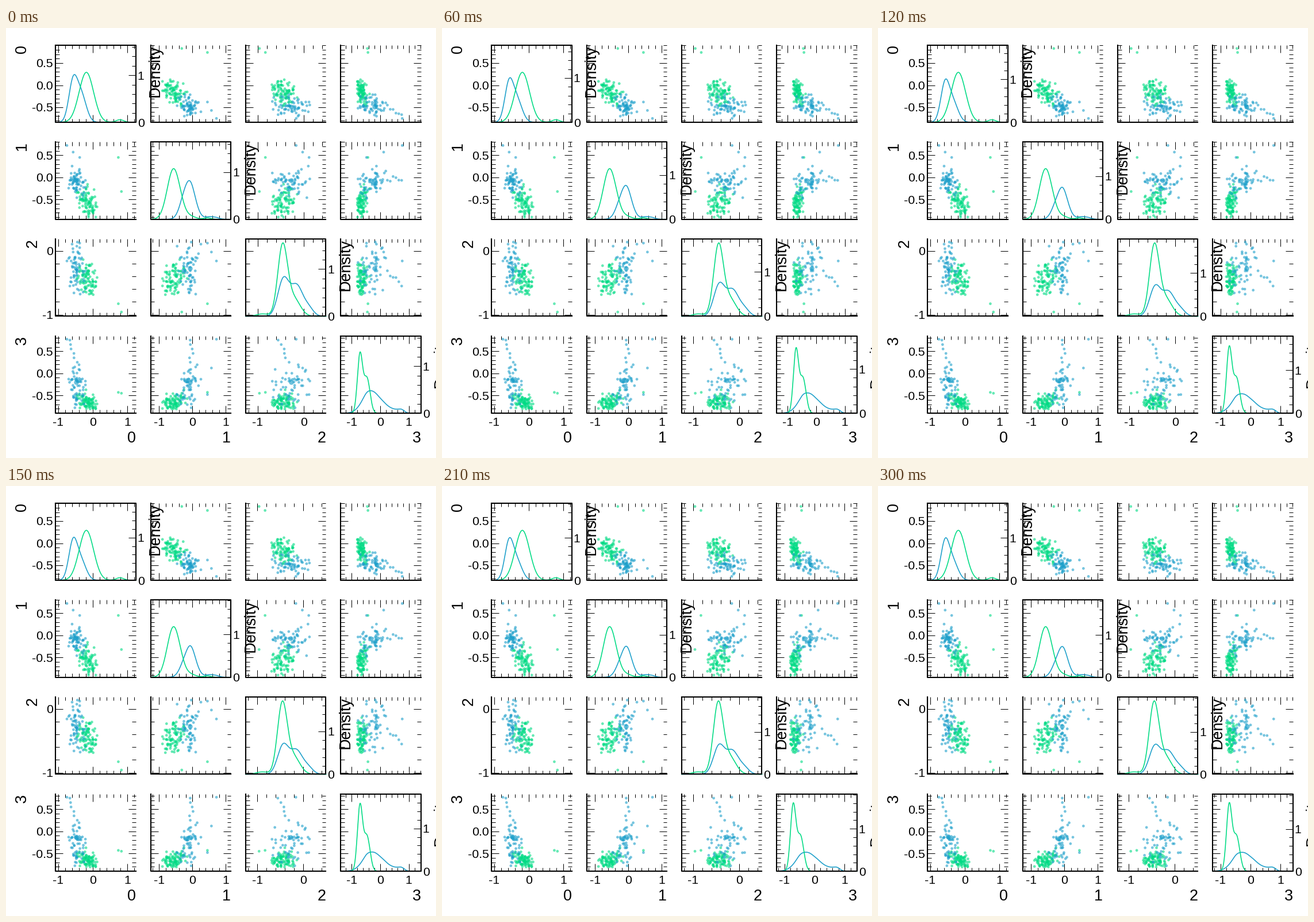
These frames come from a looping animation (748x748 px, 0.33 s). A matplotlib script:

```python
import numpy as np
import matplotlib.pyplot as plt
from matplotlib.animation import FuncAnimation
from matplotlib.collections import LineCollection

SIZE, DPI = 748, 100
FRAMES, INTERVAL = 11, 30
PT = 72 / DPI
GREEN, BLUE = "#00db84", "#1c9fca"
TICK_FONT, AXIS_FONT = 21.3, 27
plt.rcParams["font.family"] = "Liberation Sans"

# Panel grid in pixels
STEP_X, STEP_Y, W, H = 165.33, 168.67, 139.3, 134.6
LEFT = 86.5 + STEP_X * np.arange(4)
TOP = 29.5 + STEP_Y * np.arange(4)
RIGHT, BOTTOM = LEFT + W, TOP + H

# Vertical data scales: pixel of zero and pixels per unit
Y_ZERO = [99.5, 259.8, 387.5, 600.7]
Y_UNIT = [77, 77, 111, 77]

# Bell curves per panel: centre, sigma, height in pixels, share that fades
GREEN_BELLS = [
    [(-.187, .21, 87, 0)],
    [(-.565, .19, 88, 0), (-.07, .17, 5, 0)],
    [(-.456, .106, 121, 0), (-.21, .14, 30, 0)],
    [(-.71, .09, 101, -.13), (-.47, .11, 56, 0)],
]
BLUE_BELLS = [
    [(-.57, .12, 52, .05), (-.337, .15, 46, .36)],
    [(-.207, .155, 44, .4), (.017, .155, 27, .05)],
    [(-.437, .12, 53, .3), (-.15, .125, 48, .27), (.1, .11, 12, .27)],
    [(-.4, .26, 31, .25), (-.06, .24, 16, -.1)],
]


def settle(start, end, i):
    """Value that runs quickly from start and levels off at end."""
    return end + (start - end) * np.exp(-i / 2.3)


def bell(v, centre, sigma):
    return np.exp(-((v - centre) / sigma) ** 2 / 2)


def x_scale(col, i):
    """Zero pixel and pixels per unit; the last column jumps to and fro."""
    if col == 3:
        return (648, 52.3) if i % 3 == 1 else (651, 49.7)
    return ((151, 60), (324.3, 58), (517.6 - .11 * i, 80))[col]


def to_x(col, v, i):
    zero, unit = x_scale(col, i)
    return zero + unit * v


def to_y(row, v):
    return Y_ZERO[row] - Y_UNIT[row] * v


def cluster(n, mean, sd, loading):
    """Points whose four values share one hidden factor."""
    load = np.array(loading)
    z = load * rng.normal(size=(400, 1)) + np.sqrt(1 - load ** 2) * rng.normal(size=(400, 4))
    z = z[(abs(z) < 2.1).all(axis=1)][:n]
    pts = np.array(mean) + np.array(sd) * z
    pts[:, 3] = abs(pts[:, 3] + .81) - .81
    return pts


rng = np.random.default_rng(7)
green_strays = np.array([[.74, .45, -.83, -.43], [.83, -.32, -.96, -.45]])
tail = np.linspace([-.45, -.08, -.3, .25], [-.7, 0, -.53, .75], 6)
tail[:, :3] += rng.normal(0, .05, (6, 3))
blue_strays = np.vstack([
    [[-.75, .72, -.16, .77], [-.57, .57, -.02, .12], [-.38, .45, .12, -.48]], tail])
green = np.vstack([
    cluster(86, [-.17, -.52, -.43, -.62], [.16, .19, .14, .14], [-.75, .65, .2, .6]),
    green_strays])
blue = np.vstack([
    cluster(58, [-.47, -.11, -.27, -.3], [.13, .18, .2, .25], [-.6, .45, .3, .6]),
    blue_strays])
points = np.vstack([green, blue])
colors = np.array([GREEN] * len(green) + [BLUE] * len(blue))
order = rng.permutation(len(points))
points, colors = points[order], colors[order]

fig = plt.figure(figsize=(SIZE / DPI, SIZE / DPI), dpi=DPI, facecolor="white")
ax = fig.add_axes([0, 0, 1, 1])
ax.set_xlim(0, SIZE)
ax.set_ylim(SIZE, 0)
ax.axis("off")


def strokes(segments, width, z):
    lines = LineCollection(segments, colors="black", linewidths=width * PT,
                           capstyle="projecting" if width > 1 else "butt", zorder=z)
    ax.add_collection(lines)
    return lines


def label(x, y, s, size, ha="center", upright=True):
    """Text whose digits are centred on the given point."""
    drop = .35 * size
    if upright:
        return ax.text(x, y + drop, s, fontsize=size * PT, ha=ha, va="baseline", zorder=6)
    return ax.text(x + drop, y, s, fontsize=size * PT, ha="center", va="baseline",
                   rotation=90, rotation_mode="anchor", zorder=6)


def tick_length(k):
    return 13 if k % 5 == 0 else 6.5


def x_ticks(i):
    segments = []
    for col in range(4):
        for k in range(-8, 9):
            x = to_x(col, k / 5, i)
            if LEFT[col] < x < RIGHT[col]:
                n = tick_length(k)
                for t, b in zip(TOP, BOTTOM):
                    segments += [[(x, t), (x, t + n)], [(x, b), (x, b - n)]]
    return segments


def y_ticks():
    segments = []
    for row in range(4):
        step = .2 if row == 2 else .1
        for k in range(-12, 13):
            y = to_y(row, k * step)
            if TOP[row] < y < BOTTOM[row]:
                n = tick_length(k)
                for col in range(4):
                    segments.append([(LEFT[col], y), (LEFT[col] + n, y)])
                    if col != row:
                        segments.append([(RIGHT[col], y), (RIGHT[col] - n, y)])
    return segments


def density_ticks(unit):
    segments = []
    for r, b in zip(RIGHT, BOTTOM):
        for k in range(int(5 * H / unit) + 1):
            y = b - k * unit / 5
            segments.append([(r, y), (r - tick_length(k), y)])
    return segments


# Still parts: spines, vertical ticks and labels
spines = []
for row in range(4):
    for col in range(4):
        l, r, t, b = LEFT[col], RIGHT[col], TOP[row], BOTTOM[row]
        spines.append([(l, t), (l, b), (r, b)] + ([(r, t), (l, t)] if row == col else []))
strokes(spines, 2.1, 5)
strokes(y_ticks(), 1, 1)

for row in range(4):
    whole = row == 2
    for v in ((0, -1) if whole else (.5, 0, -.5)):
        label(82, to_y(row, v), str(v) if whole else f"{v:.1f}", TICK_FONT, "right")
    label(44 if whole else 26, 37 + STEP_Y * row, str(row), AXIS_FONT, upright=False)
    label(RIGHT[row], 712, str(row), AXIS_FONT, "right")
    label(RIGHT[row] + 3, BOTTOM[row], "0", TICK_FONT, "left")
    label(257.7 + STEP_X * row, 75 + STEP_Y * row, "Density", AXIS_FONT, upright=False)

# Moving parts
x_lines = strokes([], 1, 1)
density_lines = strokes([], 1, 1)
ones = [label(RIGHT[d] + 3, 0, "1", TICK_FONT, "left") for d in range(4)]
x_labels = [(col, v, label(0, 685, str(v), TICK_FONT))
            for col in range(4) for v in (-1, 0, 1) if (col, v) != (2, 1)]
clouds = []
for row in range(4):
    for col in range(4):
        if row != col:
            zeros = np.zeros(len(points))
            dots = ax.scatter(zeros, zeros, s=11.5, c=colors, alpha=.6, linewidths=0, zorder=2)
            centre = ax.scatter([0], [0], s=37, c=BLUE, alpha=.65, linewidths=0, zorder=3)
            clouds.append((row, col, dots, centre))
curves = []
for d in range(4):
    for color, bells, strays in ((BLUE, BLUE_BELLS, blue_strays),
                                 (GREEN, GREEN_BELLS, green_strays)):
        line, = ax.plot([], [], color=color, lw=1.6 * PT, zorder=4)
        curves.append((d, bells[d], strays[:, d], line))


def draw(i):
    unit = settle(82, 73.5, i)
    x_lines.set_segments(x_ticks(i))
    density_lines.set_segments(density_ticks(unit))
    for d, text in enumerate(ones):
        text.set_y(BOTTOM[d] - unit + .35 * TICK_FONT)
    for col, v, text in x_labels:
        text.set_x(to_x(col, v, i))

    mid = [-.49, -.07, -.275, settle(-.2, -.12, i)]
    for row, col, dots, centre in clouds:
        dots.set_offsets(np.column_stack([to_x(col, points[:, col], i),
                                          to_y(row, points[:, row])]))
        centre.set_offsets([(to_x(col, mid[col], i), to_y(row, mid[row]))])

    for d, bells, strays, line in curves:
        px = np.linspace(LEFT[d], RIGHT[d], 200)
        zero, scale = x_scale(d, i)
        v = (px - zero) / scale
        height = sum(h * settle(1, 1 - fade, i) * bell(v, c, s) for c, s, h, fade in bells)
        height += sum(2.5 * bell(v, c, .1) for c in strays)
        line.set_data(px, BOTTOM[d] - height)
    return []


anim = FuncAnimation(fig, draw, frames=FRAMES, interval=INTERVAL, repeat=True,
                     repeat_delay=0, init_func=lambda: draw(0), blit=False)
plt.show()
```
